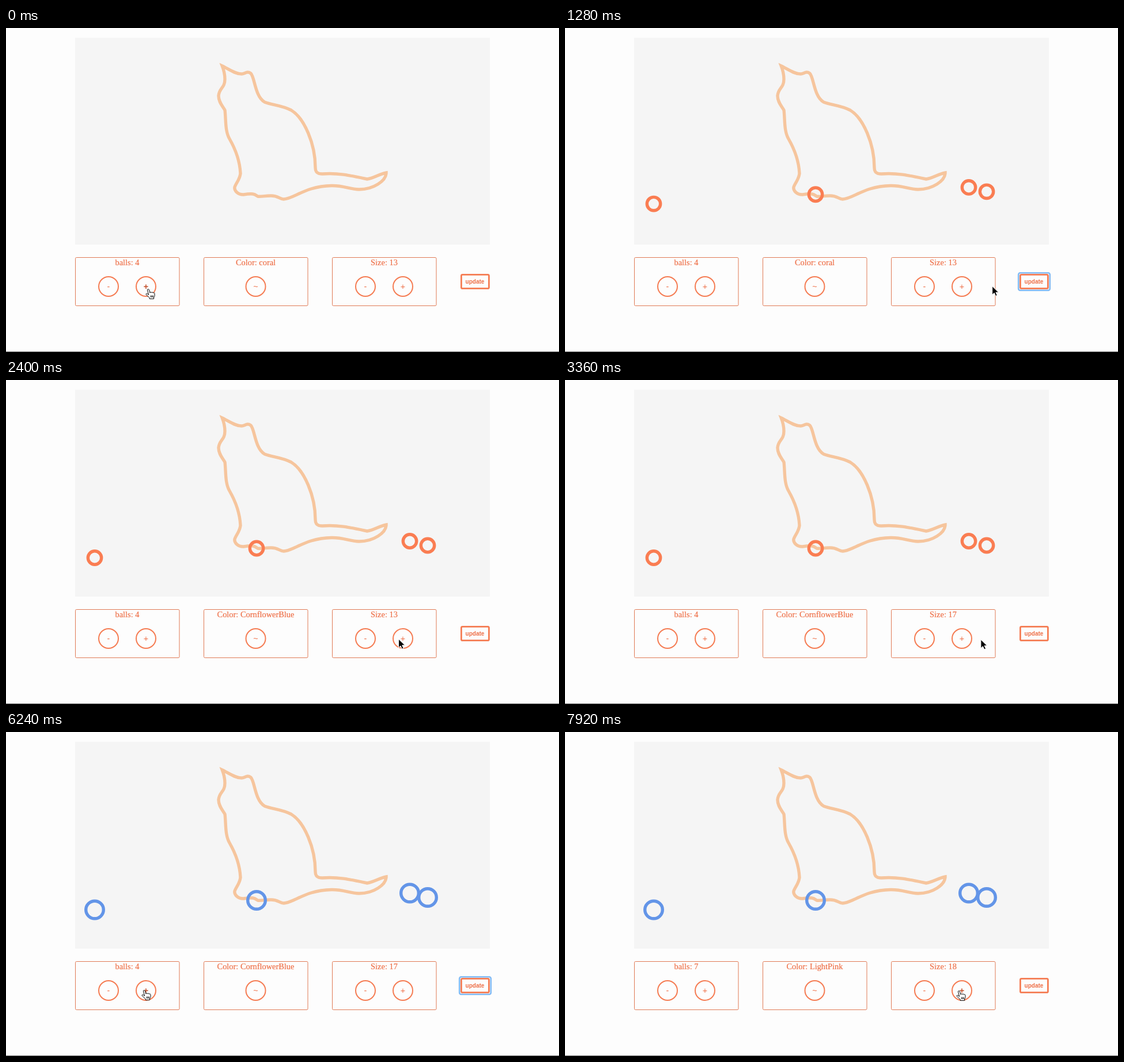
Write an HTML page that moves like this. It is 960 by 564 pixels and loops after 8 s.

```html
<!DOCTYPE html>
<html lang="en">
<head>
<meta charset="utf-8">
<title>Bouncing balls</title>
<style>
  html, body { margin: 0; width: 100%; height: 100%; overflow: hidden; background: #fdfdfd; }
  svg { display: block; width: 960px; height: 564px; }
  text { text-anchor: middle; fill: #ee6f47; }
  .label { font: 14.4px "Liberation Serif", Times, serif; stroke: #ee6f47; stroke-width: .2; }
  .sign { font: 14.4px "Liberation Sans", Arial, sans-serif; }
  .sign.hover { font-weight: bold; fill: #c4532f; }
  .update { font: bold 10px "Liberation Sans", Arial, sans-serif; }
  .line { fill: none; stroke: #f57c53; }
  .box { fill: none; stroke: #e07a55; }
</style>
</head>
<body>
<svg viewBox="0 0 960 564">
  <clipPath id="stage"><path d="M120 17h720v360h-720z"/></clipPath>
  <path d="M120 17h720v360h-720z" fill="#f5f5f5"/>
  <path fill="none" stroke="#f6c59d" stroke-width="5.4" d="M375.3 66
    C386 71 397 80 409 80 C415 80 418 74 425 79 C432 86 432 119 449 129
    C461 134 478 134 495 143 C518 157 537 202 537 243 C537 252 542 254 549 254
    C575 252 595 256 627 263 C640 261 648 254 660 252 C660 266 638 281 613 281
    C595 280 585 274 565 274.5 C520 275 499 298 482 298 C475 298 473 292 460 292
    C448 292 442 294 437 293 C432 290 432 287 412 290 C402 290 396 283 397 277
    C399 270 406 264 407 253 C406 233 400 214 388 193 C380 179 382 160 380 143
    C376 136 369 129 369 118 C370 104 380 105 380 89 C380 80 378 73 375.3 66 Z"/>
  <g id="balls" clip-path="url(#stage)" fill="none" stroke-width="5.4"></g>
  <g id="panel"></g>
  <rect id="focus" x="787.2" y="426.2" width="54.6" height="30.6" rx="3" fill="none" stroke="#83bbf4" stroke-width="2.6"/>
  <rect class="line" x="790.4" y="429.4" width="48" height="24" rx="2" stroke-width="2.8"/>
  <text class="update" x="814" y="445">update</text>
  <path d="M0 563.5h960" stroke="#777"/>
  <path id="arrow" stroke="#fff" d="M0 0V15L3.5 11.8L6 17.2L8.6 16L6.2 10.8H11Z"/>
  <path id="hand" fill="#fff" stroke="#000" stroke-linejoin="round"
    d="M-1.6 .8C-1.6-.8 1-.8 1.4 .8L3 6C3 4.4 5.4 4.2 5.8 5.8C6.2 4.4 8.2 4.8 8.4 6.2C9.2 5.2 11 5.8 11 7.4V11.6L9.6 14V16.4H2.2V14.6L-3.8 9C-4.6 7.4-2.6 6.6-1.2 8L.6 9.4ZM4.4 10.5v3.5M6.4 10.5v3.5M8.3 10.5v3.5"/>
</svg>
<script>
const $ = id => document.getElementById(id);
const add = (parent, tag, attrs, text = "") => {
  const el = document.createElementNS("http://www.w3.org/2000/svg", tag);
  for (const k in attrs) el.setAttribute(k, attrs[k]);
  el.textContent = text;
  return parent.appendChild(el);
};
const show = (id, on) => { $(id).style.display = on ? "" : "none"; };
const clamp = x => Math.min(1, Math.max(0, x));

const LOOP = 8000, STEP = 80, DROP = 912, RESTYLE = 3800;
const balls = [[154, 309.5], [435, 293], [701, 280.5], [732, 288]]
  .map(([cx, rest]) => ({ rest, el: add($("balls"), "circle", { cx }) }));

const buttons = [];
const labels = ["-+", "~", "-+"].map((signs, i) => {
  const x = 120.5 + 223 * i, mid = x + 90;
  add($("panel"), "rect", { class: "box", x, y: 399.5, width: 180.5, height: 84, rx: 2 });
  [...signs].forEach((sign, j) => {
    const bx = mid + 65 * (j - (signs.length - 1) / 2);
    add($("panel"), "circle", { class: "line", cx: bx, cy: 450, r: 17, "stroke-width": 2 });
    buttons.push({ x: bx, el: add($("panel"), "text", { class: "sign", x: bx, y: 455 }, sign) });
  });
  return add($("panel"), "text", { class: "label", x: mid, y: 413 });
});

// each glide: start time, end time, where the pointer goes
const START = [247, 455], ADD = [240, 450], COLOR = [436, 450], GROW = [684, 451], UPDATE = [814, 444];
const glides = [
  [160, 700, UPDATE], [1070, 1820, COLOR], [2080, 2420, GROW], [3260, 3540, UPDATE],
  [5400, 6120, ADD], [6780, 7080, COLOR], [7340, 7640, GROW]
];

function pointer(t) {
  let [x, y] = START;
  for (const [from, to, [tx, ty]] of glides) {
    const k = clamp((t - from) / (to - from)), p = k * k * (3 - 2 * k);
    const dip = 0.035 * Math.abs(tx - x) * Math.sin(Math.PI * p) ** 2;
    x += (tx - x) * p;
    y += (ty - y) * p + dip;
    if (k < 1) break;
  }
  return [x, y];
}

// number of clicks made so far in a run of n
const clicks = (t, first, n = 1) => Math.min(n, Math.max(0, Math.floor((t - first) / 180) + 1));

function bounce(t) {
  t = clamp(t);
  const [mid, base] = t < 4 / 11 ? [0, 0] : t < 8 / 11 ? [6 / 11, 3 / 4]
    : t < 10 / 11 ? [9 / 11, 15 / 16] : [21 / 22, 63 / 64];
  return 7.5625 * (t - mid) ** 2 + base;
}

function draw(t) {
  const fall = bounce((t - DROP) / 1000), restyle = bounce((t - RESTYLE) / 1000);
  const mix = (a, b) => a + (b - a) * restyle;
  show("balls", t >= DROP);
  $("balls").style.stroke = `rgb(${mix(250, 99)},${mix(125, 149)},${mix(82, 232)})`;
  for (const { rest, el } of balls) {
    el.setAttribute("cy", 17 + (rest - 17) * fall);
    el.setAttribute("r", 0.9 * mix(13, 17));
  }

  const added = clicks(t, 6320, 3), recolored = clicks(t, 1960) + clicks(t, 7240);
  const grown = clicks(t, 2480, 4) + clicks(t, 7840);
  labels[0].textContent = "balls: " + (4 + added);
  labels[1].textContent = "Color: " + ["coral", "CornflowerBlue", "LightPink"][recolored];
  labels[2].textContent = "Size: " + (13 + grown);
  show("focus", t >= 850 && !recolored || t >= 3720 && !added);

  // hover starts one step after the pointer arrives
  const now = pointer(t), before = pointer(t - STEP);
  let over = false;
  for (const { x, el } of buttons) {
    const hit = [now, before].every(p => Math.hypot(p[0] - x, p[1] - 450) < 18);
    el.classList.toggle("hover", hit);
    over = over || hit;
  }
  show("arrow", !over);
  show("hand", over);
  $(over ? "hand" : "arrow").setAttribute("transform", `translate(${now})`);
}

function tick() {
  const t = performance.now() % LOOP;
  draw(t - t % STEP);
  requestAnimationFrame(tick);
}
tick();
</script>
</body>
</html>
```
